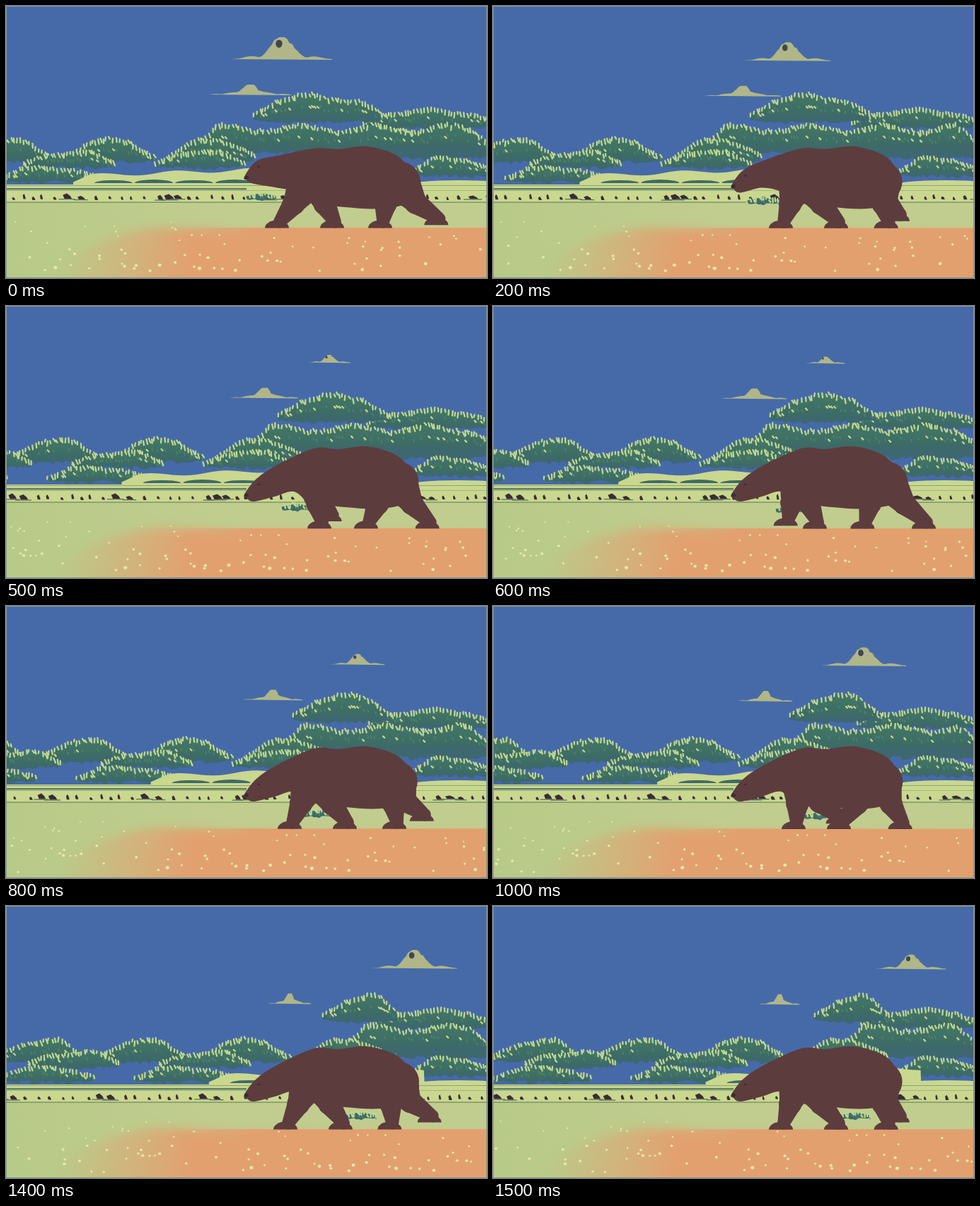
Animation, 680 px wide and 384 px high, one loop 1.6 s. Source, as an HTML page with a canvas:

```html
<!DOCTYPE html>
<html lang="en">
<head>
<meta charset="utf-8">
<title>Walking bear</title>
<style>
html, body { margin: 0; width: 100%; height: 100%; overflow: hidden; background: #466aa8; }
canvas { display: block; width: 100vw; height: 100vh; }
</style>
</head>
<body>
<canvas id="stage" width="680" height="384"></canvas>
<script>
const ctx = document.getElementById('stage').getContext('2d');
const W = 680, H = 384, STEP = 100, STEPS = 16;
const PAN = 13.7;    // drift of the horizon per step
const STRIDE = 13;   // steps in one walk cycle
const STANCE = 9;    // steps a paw stays on the ground
const SKY = '#466aa8', PALE = '#cad78f', FIELD = '#c1cd8f', ORANGE = '#e2a06f', CLEAR = 'rgba(226,160,111,0)';
const TEAL = '#3d6b66', LEAF = '#bfd78d', BEAR = '#5d3c3e', DARK = '#3b2b36', CLOUD = '#b0b687';

function seeded(s) {
  return () => {
    s = s + 0x6D2B79F5 | 0;
    let v = Math.imul(s ^ s >>> 15, 1 | s);
    v = v + Math.imul(v ^ v >>> 7, 61 | v) ^ v;
    return ((v ^ v >>> 14) >>> 0) / 4294967296;
  };
}

const mix = (a, b, u) => a + (b - a) * u;

function rect(x, y, w, h, color) {
  ctx.fillStyle = color;
  ctx.fillRect(x, y, w, h);
}

function oval(x, y, rx, ry, color) {
  ctx.fillStyle = color;
  ctx.beginPath();
  ctx.ellipse(x, y, rx, ry, 0, 0, 7);
  ctx.fill();
}

function dome(x, base, rx, ry, color) {
  ctx.fillStyle = color;
  ctx.beginPath();
  ctx.ellipse(x, base, rx, ry, 0, Math.PI, 2 * Math.PI);
  ctx.fill();
}

function poly(pts, color) {
  ctx.fillStyle = color;
  ctx.beginPath();
  pts.forEach(p => ctx.lineTo(...p));
  ctx.fill();
}

// Closed Catmull-Rom curve through all points.
function blob(pts, color) {
  const at = i => pts[(i + pts.length) % pts.length];
  ctx.fillStyle = color;
  ctx.beginPath();
  ctx.moveTo(...pts[0]);
  pts.forEach((b, i) => {
    const a = at(i - 1), c = at(i + 1), d = at(i + 2);
    ctx.bezierCurveTo(b[0] + (c[0] - a[0]) / 6, b[1] + (c[1] - a[1]) / 6,
      c[0] - (d[0] - b[0]) / 6, c[1] - (d[1] - b[1]) / 6, c[0], c[1]);
  });
  ctx.fill();
}

function taper(x1, y1, r1, x2, y2, r2) {
  const a = Math.atan2(y2 - y1, x2 - x1) + Math.PI / 2;
  const c = Math.cos(a), s = Math.sin(a);
  poly([[x1 + c * r1, y1 + s * r1], [x2 + c * r2, y2 + s * r2],
    [x2 - c * r2, y2 - s * r2], [x1 - c * r1, y1 - s * r1]], BEAR);
  oval(x1, y1, r1, r1, BEAR);
  oval(x2, y2, r2, r2, BEAR);
}

// Flat base, one billowing peak and low puffs beside it.
function cloud(x, base, w, h, seed) {
  const rnd = seeded(seed), pts = [];
  for (let u = -1; u <= 1; u += 0.05) {
    const peak = Math.exp(-Math.pow(u / 0.22, 2)) * (0.75 + 0.25 * rnd());
    const puff = (1 - Math.abs(u)) * (0.1 + 0.25 * Math.abs(Math.sin(u * 7 + seed)));
    pts.push([x + u * w / 2, base - h * Math.min(1, peak + puff)]);
  }
  pts.push([x + w / 2, base + 1]);
  poly(pts, CLOUD);
}

function tufts(list, color, width) {
  ctx.strokeStyle = color;
  ctx.lineWidth = width;
  ctx.lineCap = 'round';
  ctx.beginPath();
  list.forEach(([x, y, dx, dy]) => {
    ctx.moveTo(x, y);
    ctx.lineTo(x + dx, y + dy);
  });
  ctx.stroke();
}

// A long low stand of trees with bright ragged tips.
function wood(x0, x1, top, base, seed) {
  const rnd = seeded(seed), h = base - top;
  const upper = [], lower = [], bright = [], dull = [];
  for (let x = x0; x <= x1; x += 3 + rnd() * 3) {
    const end = Math.min(1, 0.25 + (x - x0) / 45, 0.25 + (x1 - x) / 45);
    const hump = 0.13 * Math.sin((x - x0) * 0.06 + seed);
    const y = base - h * end * (0.83 + hump + rnd() * 0.1);
    upper.push([x, y]);
    lower.unshift([x, base + 6 * end * rnd()]);
    bright.push([x, y - 1 - rnd() * 2, rnd() * 4 - 1, 3 + rnd() * 4]);
    if (rnd() < 0.45) dull.push([x, mix(y, base, 0.35 + rnd() * 0.2), 1, 3]);
    if (rnd() < 0.14) bright.push([x, mix(y, base, 0.45), 2, 2]);
  }
  const g = ctx.createLinearGradient(0, top, 0, base + 6);
  g.addColorStop(0, '#437765');
  g.addColorStop(0.65, TEAL);
  g.addColorStop(1, '#3e6578');
  poly(upper.concat(lower), g);
  tufts(dull, '#4c8368', 1.8);
  tufts(bright, LEAF, 2.3);
}

function drawSky(n) {
  rect(0, 0, W, H, SKY);
  const swell = Math.cos(n * Math.PI / 6);
  const x = 390 + n * 13.4, base = 75 + n * 0.9, h = 20 + 11 * swell;
  cloud(x, base, 100 + 45 * swell, h, 3);
  oval(x - 4, base - h * 0.7, h * 0.15, h * 0.18, '#41474e');
  cloud(345 + n * 4, 125 + n * 0.9, 118 - n * 4, 14, 8);
}

function drawWoods(n) {
  const dx = n * PAN;
  wood(505 + n, 690, 147, 170, 21);
  wood(350 + n * 7, 530 + n * 2, 126, 161, 22);
  wood(490 + n * 4, 690, 176, 212, 23);
  wood(265 + n * 15, 690, 169, 204, 24);
  wood(575, 690, 213, 238, 25);
  const row = (start, gap, width, top, base, count) => {
    for (let i = 0; i < count; i++) {
      const x = start + gap * i + dx;
      wood(x, x + width, top, base, start + i * 7 + top);
    }
  };
  row(-205, 145, 124, 189, 218, 4);
  row(-160, 185, 130, 206, 226, 3);
  row(-205, 195, 140, 228, 246, 2);
}

function drawHorizon(n) {
  const dx = n * PAN;
  const dune = [[95 + dx, 255]];
  for (let x = 95; x <= 400; x += 8) {
    dune.push([x + dx, 247 - 7 * Math.min(1, (x - 95) / 25) - (x - 95) / 28 - 2.5 * Math.sin(x / 17)]);
  }
  dune.push([400 + dx, 255]);
  poly(dune, PALE);
  for (let i = 0; i < 4; i++) dome(152 + i * 57 + dx, 250, 27, 4 + i % 2, TEAL);
  dome(640, 254, 75, 8, PALE);

  rect(0, 252, W, 26, PALE);
  rect(0, 253, W, 1, '#8ca273');
  rect(0, 257, 340, 2.5, '#5f8268');
  rect(0, 260, W, 1, '#a5b77e');
  rect(0, 276.5, W, 1.3, '#68805c');

  // Boulders bunch up at regular distances, with small posts between.
  const rnd = seeded(5);
  for (let x = -200; x < 690; x += 11 + rnd() * 12) {
    const bunch = Math.pow(Math.max(0, Math.cos((x - 92) * Math.PI / 71)), 3);
    const w = 3 + rnd() * 2 + 9 * bunch, h = 4 + rnd() * 4, cx = x + dx, y = 272 + rnd() * 2;
    poly([[cx - w / 2, y - h * 0.7], [cx, y - h], [cx + w * 0.4, y - h * 0.5],
      [cx + w * 0.6, y], [cx - w * 0.3, y]], DARK);
    if (bunch > 0.3) rect(cx - w, y, w * 2, 1.2, '#526e57');
  }
}

function drawGround(n) {
  const g = ctx.createLinearGradient(0, 0, 320, 0);
  g.addColorStop(0, '#b8ca88');
  g.addColorStop(1, FIELD);
  rect(0, 277.8, W, H, g);

  const edge = 313 + n * 0.15;
  const warm = ctx.createLinearGradient(80, 335, 260, 365);
  warm.addColorStop(0, CLEAR);
  warm.addColorStop(1, ORANGE);
  ctx.save();
  ctx.filter = 'blur(7px)';
  ctx.fillStyle = warm;
  ctx.beginPath();
  ctx.moveTo(30, 400);
  ctx.quadraticCurveTo(120, 318, 220, 313);
  ctx.lineTo(330, edge + 6);
  ctx.lineTo(720, edge + 12);
  ctx.lineTo(720, 400);
  ctx.fill();
  ctx.restore();
  const solid = ctx.createLinearGradient(230, 0, 350, 0);
  solid.addColorStop(0, CLEAR);
  solid.addColorStop(1, ORANGE);
  rect(220, edge, W, H, solid);

  // Nearer flecks slide faster.
  const rnd = seeded(41);
  for (let i = 0; i < 125; i++) {
    const y = 290 + 86 * Math.pow(rnd(), 0.75);
    const x = rnd() * 1010 - 330 + n * (PAN + (y - 277) * 0.066);
    const r = 0.7 + (y - 285) / 70 * (0.6 + rnd() * 0.8);
    if (y > 317 || x < 250) oval(x, y, r * 1.1, r, '#e7e7aa');
  }
}

// A paw is carried back by the ground, then swings forward in the air.
function paw(step, front, reach) {
  const p = (step + STRIDE) % STRIDE;
  if (p < STANCE) return { x: front + reach * p / STANCE, lift: 0 };
  const u = (p - STANCE) / (STRIDE - STANCE);
  return { x: front + reach * (1 - Math.pow(u, 2.5)), lift: 11 * Math.sin(Math.PI * u) };
}

function drawLeg(hip, foot, ground) {
  const y = ground - foot.lift, lean = foot.x - hip;
  const kx = hip + lean * 0.56 - foot.lift * 0.4, ky = 279 - foot.lift * 0.3;
  taper(hip + lean * 0.2, 248, 28, kx, ky, 16);
  taper(kx, ky, 16, foot.x + 3, y - 9, 9);
  dome(foot.x - 1, y, 17, 11, BEAR);
}

function drawBear(n) {
  const ground = 313.5 + n * 0.15;
  const fore = [paw(n, 384, 108), paw(n + STRIDE / 2, 384, 108)];
  const hind = [paw(n + 3, 490, 120), paw(n + 3 + STRIDE / 2, 490, 120)];
  fore.forEach(f => drawLeg(436, f, ground));
  hind.forEach(f => drawLeg(545, f, ground));

  const nx = 337, ny = 266 - 25 * Math.max(0, 1 - n / 4);
  const seat = 574 + 0.35 * (Math.max(hind[0].x, hind[1].x) - 572);
  blob([
    [nx, ny], [nx + 17, ny - 22], [385, mix(ny - 20, 201, 0.5)], [436, 201], [470, 202],
    [507, 198], [542, 206], [565, 222], [seat, 252], [seat - 10, 276],
    [530, 286], [480, 284], [430, 277], [407, 262],
    [380, Math.max(256, ny + 3)], [nx + 13, ny + 10], [nx + 3, ny + 5]
  ], BEAR);
  oval(nx + 3, ny + 1, 3, 2.5, DARK);
  oval(nx + 20, ny - 14, 1.8, 1.3, DARK);
}

function draw(n) {
  drawSky(n);
  drawWoods(n);
  drawHorizon(n);
  drawGround(n);
  const low = 258 + Math.min(n, 9) * 3;
  wood(338 + n * 10, 385 + n * 10, low, low + 14, 60);
  drawBear(n);
  ctx.strokeStyle = '#84998c';
  ctx.lineWidth = 1;
  ctx.strokeRect(0.5, 0.5, W - 1, H - 1);
}

let shown = -1;
function tick() {
  const n = Math.floor(performance.now() / STEP) % STEPS;
  if (n !== shown) draw(shown = n);
  requestAnimationFrame(tick);
}
tick();
</script>
</body>
</html>
```
